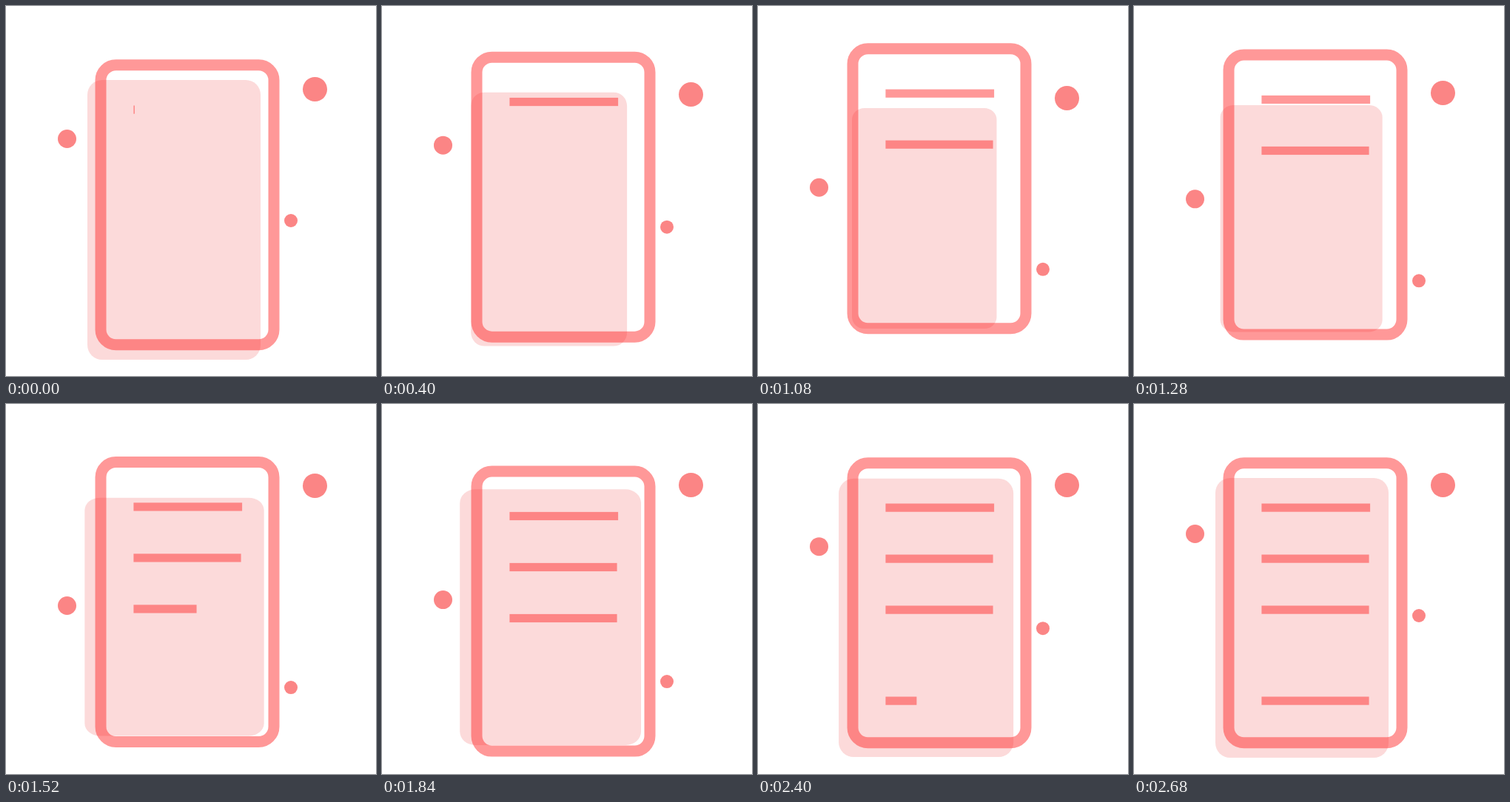
An HTML page for the animation above (2880 ms loop, 500 px wide and 500 px high).

```html
<!DOCTYPE html>
<html lang="en">
<head>
<meta charset="utf-8">
<title>Form filling loop</title>
<style>
  html, body { margin: 0; width: 100%; height: 100%; overflow: hidden; background: #fff; }
  svg { display: block; width: 100%; height: 100%; }
</style>
</head>
<body>
<svg viewBox="0 0 500 500">
  <rect id="card" width="234" height="378" rx="20" fill="#fcdada"/>
  <g id="phone" opacity=".5">
    <rect x="128" y="7.5" width="234" height="378" rx="20.5" fill="none" stroke="#f33" stroke-width="15"/>
    <g id="lines" fill="#f33">
      <rect x="172.4" y="62.3" height="11.2"/>
      <rect x="172.4" y="131.3" height="11.2"/>
      <rect x="172.4" y="200.3" height="11.2"/>
      <rect x="172.4" y="323.3" height="11.2"/>
    </g>
  </g>
  <g fill="#fb8585">
    <circle id="left" cx="82.5" r="12.5"/>
    <circle id="top" cx="417.5" r="16.5"/>
    <circle id="right" cx="385" r="9"/>
  </g>
</svg>
<script>
const LOOP = 2880, STEP = 40, LAST = 2680;
const $ = id => document.getElementById(id);
const card = $('card'), phone = $('phone'), lines = [...$('lines').children];

// Keys are [time, value]; every segment eases in and out.
const tracks = {
  phoneY: [[10, 72.2], [885, 47], [1960, 84.9], [2410, 72.2]],
  cardW: [[50, 234], [825, 180], [1635, 246], [2680, 234]],
  cardH: [[0, 378], [890, 295], [2545, 378]],
  sideY: [[115, 179.5], [1640, 274.2], [2675, 175.5]],
  topY: [[55, 112.5], [825, 129.3], [1632, 109.5]]
};
const lineStarts = [0, 650, 1298, 2260], LINE_TIME = 400;

const ease = u => u * u * (3 - 2 * u);
const progress = (t, from, to) => ease(Math.min(1, Math.max(0, (t - from) / (to - from))));

function valueAt(keys, t) {
  let value = keys[0][1];
  for (let i = 1; i < keys.length; i++) {
    const [from, a] = keys[i - 1], [to, b] = keys[i];
    value += (b - a) * progress(t, from, to);
  }
  return value;
}

function draw(t) {
  const at = name => valueAt(tracks[name], t);
  const w = at('cardW'), h = at('cardH'), side = at('sideY');
  const x = 110 + 0.4416 * (234 - w), y = 100 + 0.475 * (378 - h);
  card.setAttribute('transform', `translate(${x} ${y}) scale(${w / 234} ${h / 378})`);
  phone.setAttribute('transform', `translate(0 ${at('phoneY')})`);
  lines.forEach((line, i) => {
    const start = lineStarts[i], full = i ? 145.2 : 146.7;
    const width = t < start ? 0 : 1.5 + (full - 1.5) * progress(t, start, start + LINE_TIME);
    line.setAttribute('width', width);
  });
  $('left').setAttribute('cy', side);
  $('right').setAttribute('cy', side + 110.5);
  $('top').setAttribute('cy', at('topY'));
}

const origin = performance.now();
function tick() {
  const t = (performance.now() - origin) % LOOP;
  const held = Math.min(LAST, Math.floor(t / STEP) * STEP);
  draw(held < 2 * STEP ? 0 : held);
  requestAnimationFrame(tick);
}
tick();
</script>
</body>
</html>
```
